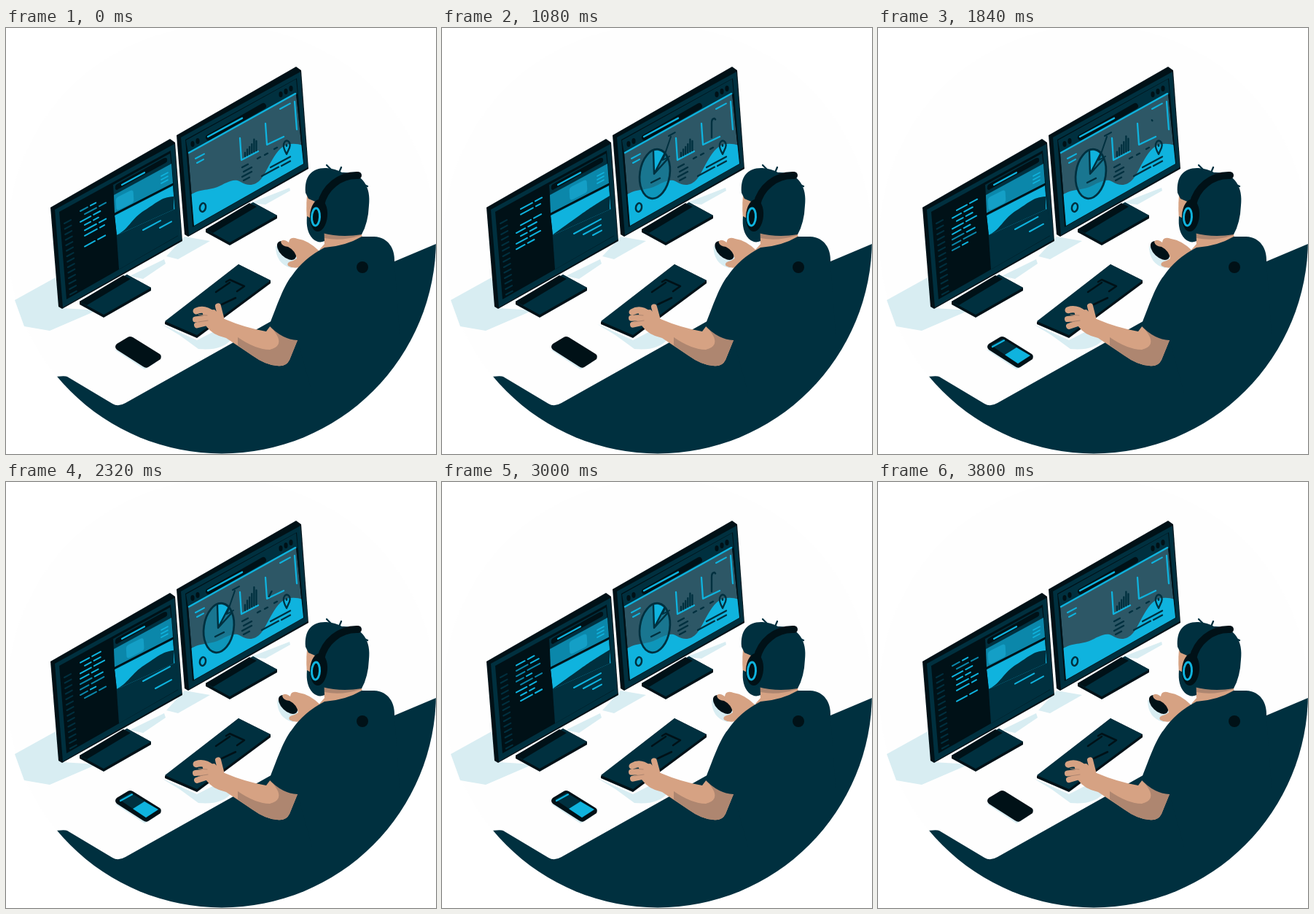
An HTML page with a canvas for the animation above (3840 ms loop, 590x584 px).

```html
<!DOCTYPE html>
<html lang="en">
<head>
<meta charset="utf-8">
<style>
html, body { margin: 0; width: 100%; height: 100%; overflow: hidden; background: #fff; }
canvas { display: block; }
</style>
</head>
<body>
<canvas id="stage" width="590" height="584"></canvas>
<script>
const ctx = document.getElementById('stage').getContext('2d');
const LOOP = 3840, HALF = LOOP / 2, STEP = 40, SLOPE = -0.54;
const navy = '#00303f', black = '#001117', cyan = '#0fb3de', grey = '#2d5766',
  blue = '#0b87aa', pale = '#d8edf2', skin = '#d6a283', shade = '#ae8670';

const fill = (d, color) => { ctx.fillStyle = color; ctx.fill(new Path2D(d)); };
const stroke = (d, color, width = 2) => {
  ctx.strokeStyle = color;
  ctx.lineWidth = width;
  ctx.stroke(new Path2D(d));
};
const dash = (x, y, length, color, width = 2) => {
  if (length > 0) stroke(`M${x} ${y}l${length} ${length * SLOPE}`, color, width);
};
const oval = (x, y, rx, ry, tilt = 0) => {
  ctx.beginPath();
  ctx.ellipse(x, y, rx, ry, tilt, 0, Math.PI * 2);
};
const disc = (x, y, rx, ry, color, tilt) => {
  oval(x, y, rx, ry, tilt);
  ctx.fillStyle = color;
  ctx.fill();
};
const ring = (x, y, rx, ry, color, width, tilt) => {
  oval(x, y, rx, ry, tilt);
  ctx.strokeStyle = color;
  ctx.lineWidth = width;
  ctx.stroke();
};
const ease = p => p * p * (3 - 2 * p);
const ramp = (t, a, b) => ease(Math.min(1, Math.max(0, (t - a) / (b - a))));
const pulse = (t, a, b, c, d) => ramp(t, a, b) - ramp(t, c, d);

// Each key is [time, value, value, ...].
function track(t, keys) {
  const i = Math.max(1, keys.findIndex(k => k[0] > t));
  const a = keys[i - 1], b = keys[i], p = ramp(t, a[0], b[0]);
  return a.slice(1).map((v, n) => v + (b[n + 1] - v) * p);
}
function clipped(d, draw) {
  ctx.save();
  ctx.clip(new Path2D(d));
  draw();
  ctx.restore();
}

let seed = 19;
const random = () => (seed = (seed * 16807) % 2147483647) / 2147483647;
const codeRows = Array.from({ length: 14 }, (_, i) => {
  if (i === 6) return [];
  let x = 102 + Math.floor(random() * 3) * 3;
  return Array.from({ length: 2 + Math.floor(random() * 2) }, () => {
    const part = [x, 6 + random() * 11, random() < 0.7 ? cyan : blue];
    x += part[1] + 4;
    return part;
  }).filter(p => p[0] + p[1] < 143);
});

function drawRoom() {
  ctx.fillStyle = '#fff';
  ctx.fillRect(0, 0, 590, 584);
  disc(296, 290, 294, 294, '#fefefe');
  ctx.save();
  oval(296, 290, 294, 293.5);
  ctx.clip();
  fill('M590 296L533 320L362 403L164 514Q154 520 146 515L84 478Q81 476 60 479V584H590Z', navy);
  ctx.restore();
  fill('M12 373L68 342L77 384L125 387L60 415L25 409ZM170 340L217 317L219 323L188 344Z', pale);
  fill('M220 313L245 286L280 292L236 317ZM335 240L389 219L390 223L356 242Z', pale);
}

function drawMonitor(x, y) {
  ctx.save();
  ctx.translate(x, y);
  fill('M40 129L105 92L138 110V114L73 151L40 133Z', black);
  fill('M40 129L105 92L138 110L73 147Z', navy);
  fill('M40 129L100 93L110 98L50 134Z', black);
  fill('M0 0L164 -94L171 -89L181 46L16 139L11 136Z', black);
  fill('M6 3L170 -87L180 44L17 137Z', navy);
  fill('M12 6L165 -78L175 39L22 126Z', black);
  ctx.restore();
}

function drawEditor(t) {
  for (let i = 0; i < 14; i++) dash(80 + i * 0.6, 268 + i * 7.5, 9, navy, 2);
  clipped('M95 249L145 222L150 286L98 313Z', () => {
    const top = t / LOOP * 14;
    codeRows.forEach((row, i) => {
      const place = (i - top + 14.5) % 14 - 0.5;
      if (place > 7.5) return;
      for (const [x, length, color] of row) {
        dash(x, 251 + place * 7.4 + (x - 102) * SLOPE, length, color, 2);
      }
    });
  });
}

function drawBrowser(u) {
  fill('M147 215L225 172L237 284L155 331Z', navy);
  stroke('M154 217L217 182', black, 7);
  dash(159, 215, 31, cyan, 2.2);
  disc(152, 219, 2.2, 3, black);
  disc(219, 181, 2.2, 3, black);
  fill('M148 229L227 186L229 213L149 254Z', blue);
  const move = pulse(u, 120, 620, 1240, 1760);
  ctx.save();
  ctx.translate(163 + 24 * move, 236 - 14 * move);
  ctx.transform(1, -0.5, 0.06, 1, 0, 0);
  ctx.fillStyle = '#149fc6';
  ctx.beginPath();
  ctx.roundRect(-12, -9, 24, 18, 4);
  ctx.fill();
  ctx.restore();
  for (let i = 0; i < 3; i++) dash(213, 203 + i * 5, 9, cyan, 1.7);

  const bend = pulse(u, 200, 950, 1200, 1800);
  clipped('M149 257L229 216L232 248L152 284Z', () => {
    fill('M149 257L229 216L234 284H152Z', cyan);
    fill(`M151 284C166 ${279 - 6 * bend} 173 ${260 + 8 * bend} 190 ${250 + 6 * bend}S212 ${232 + 9 * bend} 230 ${231 - bend}V290H151Z`, navy);
  });
  stroke('M149 255L229 214', black, 2.5);
  const lines = track(u, [
    [0, 188, 277, 24, 211, 274, 16, 0],
    [400, 188, 273, 37, 205, 283, 22, 0],
    [600, 187, 270, 37, 197, 285, 30, 0],
    [1080, 181, 282, 37, 194, 283, 24, 12],
    [1760, 188, 275, 39, 205, 284, 22, 0],
    [HALF, 188, 277, 24, 211, 274, 16, 0]
  ]);
  dash(lines[0], lines[1], lines[2], cyan);
  dash(lines[3], lines[4], lines[5], cyan);
  dash(207, 284, lines[6], cyan);
}

function drawPie(t) {
  const size = pulse(t, 120, 480, 3120, 3480);
  if (size <= 0) return;
  ctx.save();
  ctx.translate(292, 200);
  ctx.scale(size, size);
  disc(0, 0, 20.5, 34, 'rgba(15,135,168,.65)', 0.15);
  fill('M-1 0L-2 -31Q6 -34 13 -27Z', cyan);
  ring(0, 0, 20.5, 34, navy, 2.7, 0.15);
  stroke('M-2 -31L-1 0L13 -27M-1 0L18 -21M-5 12L7 6', navy, 2.4);
  ctx.restore();
  const call = pulse(t, 450, 1000, 2700, 3150);
  if (call > 0) {
    stroke(`M303 181L${303 + 11 * call} ${181 - 32 * call}`, navy, 2);
    stroke('M305 180L312 176', navy, 2);
    const foot = pulse(t, 850, 1100, 2650, 2850);
    if (foot > 0) dash(311, 148, 9 * foot, navy);
  }
}

function drawDashboard(t, u) {
  const page = 'M250 172L398 90L408 186L258 271Z';
  fill('M247 154L398 70L400 90L250 172Z', navy);
  stroke('M278 150L353 107', black, 8);
  dash(277, 149, 47, cyan, 2.5);
  for (const [x, y] of [[256, 159], [263, 155], [377, 91], [384, 87], [391, 83]]) disc(x, y, 2.6, 4, black);
  clipped(page, () => {
    fill(page, grey);
    fill('M250 231C264 220 278 223 290 218S312 205 322 211S341 217 350 207S370 160 390 159Q398 158 408 161V280H250Z', cyan);
  });
  stroke('M251 171L397 90', cyan, 2.5);
  dash(260, 179, 12, cyan);
  dash(262, 185, 9, cyan);
  stroke('M321 151L323 181L346 169M356 131L358 160L381 149M396 101L399 139', cyan, 2.3);
  dash(376, 111, 14, cyan);

  const [rise] = track(u, [[0, 1], [400, 1.5], [640, 1], [1100, 1], [1840, 1.25], [HALF, 1]]);
  [5, 8, 10, 12, 17, 13].forEach((h, i) => {
    const x = 328 + i * 3.1, y = 176 - i * 1.6;
    stroke(`M${x} ${y}v${-h * rise}`, navy, 2.3);
  });
  const [from, to] = track(u, [[0, 0, 0], [250, 0, 0], [400, 0, 8], [600, 0, 18], [1080, 16, 46], [1840, 47, 48], [1880, 48, 48], [HALF, 48, 48]]);
  if (to > from) {
    ctx.setLineDash([to - from, 200]);
    ctx.lineDashOffset = -from;
    stroke('M361 157L366 147L370 150V130Q370 124 374 124L378 129', navy, 2.3);
    ctx.setLineDash([]);
  }
  for (const [x, y] of [[345, 179], [355, 174], [368, 166]]) dash(x, y, 4, navy, 2.3);
  for (const [x, y, n] of [[324, 191, 8], [326, 197, 11], [324, 204, 13], [326, 209, 8]]) dash(x, y, n, navy, 2.3);
  drawPie(t);
  stroke('M385 173Q380 164 381 159Q383 153 387 155Q391 158 389 164Z', navy, 2.3);
  disc(385, 161, 1.4, 2, navy);
  ring(270, 246, 4, 6, navy, 2.5, 0.2);
  dash(363, 191, 27, navy, 2.3);
  dash(351, 203, 23, navy, 2.3);
  dash(378, 189, 12, navy, 2.3);
}

function drawPhone(t) {
  fill('M149 441L190 468L205 459L190 449Z', pale);
  fill('M152 433L167 424Q170 422 174 424L211 447Q214 449 212 454L195 465Q192 467 188 464L152 441Q148 437 152 433Z', black);
  ctx.globalAlpha = pulse(t, 1400, 1520, 3320, 3440);
  if (ctx.globalAlpha > 0) {
    fill('M155 435L171 426L209 449L192 460Z', navy);
    fill('M174 448L190 438L209 449L192 460Z', cyan);
    dash(157, 437, 16, cyan, 2.3);
  }
  ctx.globalAlpha = 1;
}

function drawTyping(t) {
  fill('M213 406L262 428L297 410L309 427Q296 443 264 440L238 421Z', pale);
  fill('M218 403L319 324L363 346V350L262 425L218 406Z', black);
  fill('M218 402L319 324L363 346L262 421Z', navy);
  stroke('M288 362L307 349M302 348L307 345L327 354L317 361M296 379L315 370', black, 2.5);
  const tap = n => 1.5 * Math.sin(t / LOOP * Math.PI * 2 * 8 + n * 1.8);
  stroke(`M261 ${388 + tap(0)}Q272 383 283 392`, skin, 9);
  stroke(`M260 ${398 + tap(1)}L281 397`, skin, 8);
  stroke(`M262 ${408 + tap(2)}L283 402`, skin, 8);
  stroke(`M291 ${382 + tap(3) * 0.5}L295 397`, skin, 8);
  const elbow = 'L400 428L389 455Q384 465 372 463Q356 462 338 449';
  fill(`M269 388L286 386L300 399Q328 411 357 416L363 408${elbow}L302 425Q283 421 274 408Z`, skin);
  fill(`M318 424Q343 441 362 441Q381 436 371 420L363 408${elbow}L318 435Z`, shade);
  stroke('M264 393L276 394M264 403L277 401', shade, 1);
}

function drawMouse(t) {
  const [dx] = track(t, [[0, 0], [600, 5], [1080, 2.5], [1840, 2], [2320, 2], [3000, 0], [LOOP, 0]]);
  ctx.save();
  ctx.translate(dx, 0);
  fill('M370 299Q370 323 391 329L402 326L396 305Z', pale);
  disc(385, 305, 9, 16, black, -0.8);
  fill('M377 293Q380 288 388 294Q389 285 400 289Q415 291 430 306L406 327Q395 331 387 326Q384 321 394 319L399 316Q397 305 387 300Q378 299 377 293Z', skin);
  ctx.restore();
}

function drawPerson() {
  fill('M434 268L486 270L489 288L460 308L430 304L437 296Z', skin);
  fill('M434 278L487 278V284Q461 293 437 288Z', shade);
  fill('M361 408C372 380 381 353 392 340Q408 316 437 301Q466 299 488 286H505C525 287 534 303 533 321L540 420L420 500L400 428Q379 427 361 408Z', navy);
  disc(489, 328, 8, 8, black);

  fill('M413 229L424 229V270H414Q411 250 413 229Z', skin);
  fill('M413 258Q422 264 436 266L437 292Q429 296 421 289Q411 279 413 258Z', navy);
  fill('M411 226C409 203 420 191 440 192Q452 193 461 198C490 197 501 219 498 243Q497 267 488 283Q460 288 434 281L429 240L415 234Z', navy);
  stroke('M440 188L447 195M460 191L457 198M489 214L496 217', navy, 2.3);
  stroke('M432 242C437 219 458 201 483 202', black, 10);
  disc(429, 257, 12, 22, black, 0.08);
  ring(425, 259, 5.5, 12, cyan, 3, 0.05);
}

function render(now) {
  const t = Math.floor(now % LOOP / STEP) * STEP, u = t % HALF;
  ctx.lineCap = ctx.lineJoin = 'round';
  drawRoom();
  drawMonitor(234, 147);
  drawDashboard(t, u);
  drawMonitor(61, 246);
  drawEditor(t);
  drawBrowser(u);
  drawPhone(t);
  drawTyping(t);
  drawMouse(t);
  drawPerson();
}

const start = performance.now();
function tick() {
  render(performance.now() - start);
  requestAnimationFrame(tick);
}
tick();
</script>
</body>
</html>
```
